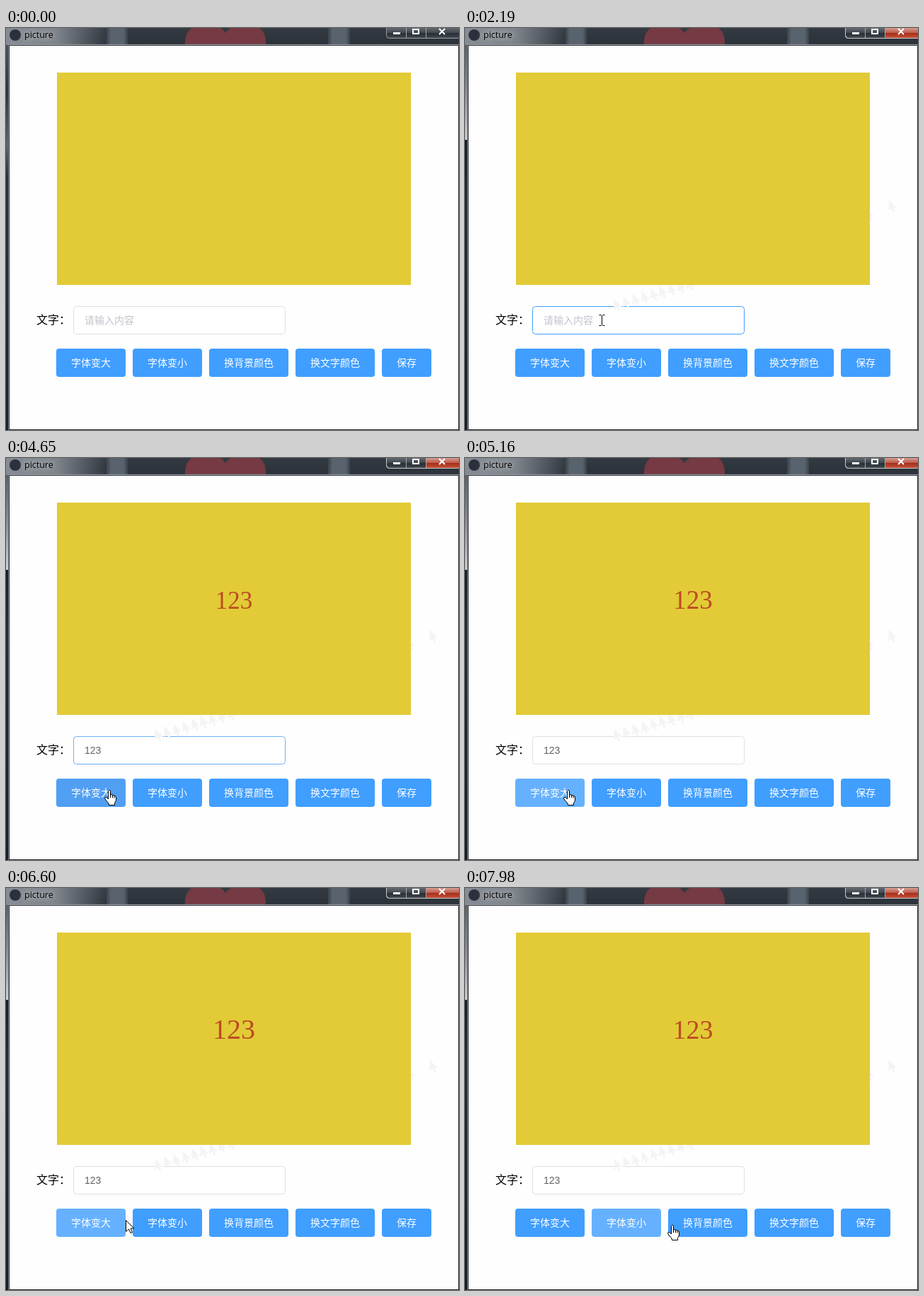
Animation, 640 px wide and 568 px high, one loop 8 s. Source, as an HTML page with a canvas:

```html
<!DOCTYPE html>
<html lang="zh-CN">
<head>
<meta charset="utf-8">
<title>picture</title>
<style>
  html, body { margin: 0; width: 100%; height: 100%; overflow: hidden; background: #fff; }
  canvas { display: block; }
</style>
</head>
<body>
<canvas id="stage" width="640" height="568"></canvas>
<script>
const ctx = document.getElementById('stage').getContext('2d');
const LOOP = 8000, TICK = 30;
const CJK = '"Noto Sans CJK SC", "Noto Sans CJK", sans-serif';

const BASE = [64, 158, 255], HOVER = [102, 177, 255], PRESSED = [58, 142, 230];
const GREY = [220, 223, 230];

// [time, x, y] of the pointer's hot spot
const pointerPath = [
  [600, 633, 208], [630, 598, 242], [900, 313, 352], [1140, 210, 382],
  [1230, 192, 413], [2160, 192, 413], [2190, 193, 413], [3390, 193, 413],
  [3630, 198, 417], [4140, 198, 417], [4380, 145, 469], [6480, 145, 469],
  [6780, 206, 470], [7770, 206, 470], [7980, 292, 476]
];

// colors: [time, color] pairs, each reached by a short transition
const buttons = [
  { x: 71, w: 98, label: '字体变大', colors: [[0, BASE], [4320, HOVER],
    [4620, PRESSED], [4800, HOVER], [4920, PRESSED], [5040, HOVER], [5250, PRESSED], [5430, HOVER],
    [5670, PRESSED], [5850, HOVER], [6030, PRESSED], [6210, HOVER], [6840, BASE]] },
  { x: 179, w: 98, label: '字体变小', colors: [[0, BASE], [6660, HOVER],
    [6840, PRESSED], [6990, HOVER], [7110, PRESSED], [7500, HOVER]] },
  { x: 287, w: 112, label: '换背景颜色', colors: [[0, BASE]] },
  { x: 409, w: 112, label: '换文字颜色', colors: [[0, BASE]] },
  { x: 531, w: 70, label: '保存', colors: [[0, BASE]] }
];
const borderColors = [[0, GREY], [1410, BASE], [4620, GREY]];
const typed = [[0, ''], [2580, '1'], [2790, '12'], [2970, '123']];
const fontSizes = [[0, 35], [4800, 36], [5040, 37], [5430, 38], [5850, 39], [6210, 40], [6990, 39], [7500, 38]];
const caretShown = [[0, false], [1410, true], [1860, false], [2370, true], [3510, false], [3870, true], [4380, false]];

const arrow = new Path2D('M.5 .5V16.5L4.5 13 7 18.5 9.5 17.5 7 12H12Z');
const hand = new Path2D('M5.5 1.5L6.5 .5H8L8.5 1.5V6.5L11 7 14 8 16 9 16.5 11V15L14.5 18.5V21.5H6.5L6 19 2.5 15 .5 12 1 10.5H3L5.5 13Z');
const handLines = new Path2D('M8.5 6V11M11.5 7.5V11M14 8.5V11.5');
const beam = new Path2D('M.5 .5H3.5M5.5 .5H8.5M4.5 1V15M.5 15.5H3.5M5.5 15.5H8.5');

const clamp = v => Math.min(1, Math.max(0, v));
const mix = (a, b, p) => a + (b - a) * p;
const lastIndex = (keys, t) => keys.findLastIndex(k => k[0] <= t);
const valueAt = (keys, t) => keys[lastIndex(keys, t)][1];

function colorAt(keys, t, duration) {
  const i = lastIndex(keys, t), [start, to] = keys[i];
  const from = i ? keys[i - 1][1] : to;
  const p = 1 - (1 - clamp((t - start) / duration)) ** 2;
  return `rgb(${to.map((c, n) => Math.round(mix(from[n], c, p)))})`;
}

function pointerAt(t) {
  const i = lastIndex(pointerPath, t), a = pointerPath[i], b = pointerPath[i + 1] || a;
  const p = clamp((t - a[0]) / (b[0] - a[0] || 1));
  return [Math.round(mix(a[1], b[1], p)), Math.round(mix(a[2], b[2], p))];
}

function rect(x, y, w, h, fill) {
  ctx.fillStyle = fill;
  ctx.fillRect(x, y, w, h);
}

function rounded(x, y, w, h, r, fill, stroke) {
  ctx.beginPath();
  ctx.roundRect(x, y, w, h, r);
  if (fill) { ctx.fillStyle = fill; ctx.fill(); }
  if (stroke) { ctx.strokeStyle = stroke; ctx.lineWidth = 1; ctx.stroke(); }
}

function text(str, x, y, font, fill, align = 'left') {
  ctx.font = font;
  ctx.fillStyle = fill;
  ctx.textAlign = align;
  ctx.fillText(str, x, y);
}

function gradient(x0, y0, x1, y1, ...stops) {
  const g = ctx.createLinearGradient(x0, y0, x1, y1);
  stops.forEach(([at, color]) => g.addColorStop(at, color));
  return g;
}

function drawFrame(active) {
  rect(0, 0, 640, 568, '#1c222a');
  rect(0, 0, 640, 24, gradient(0, 0, 0, 24, [0, '#343a42'], [1, '#2b3139']));
  for (const [x, w] of [[142, 30], [455, 31]])
    rect(x, 0, w, 24, gradient(x, 0, x + w, 0, [0, '#3a424b'], [.2, '#59636e'], [.8, '#59636e'], [1, '#3a424b']));

  ctx.fillStyle = '#753a43';
  ctx.fill(new Path2D('M253 24C252 10 258 1 267 -3H296Q306 0 310 7Q315 0 324 -3H353Q368 3 367 24Z'));

  rect(0, 0, 145, 24, gradient(0, 0, 145, 0, [0, '#868c93'], [.5, '#7c8289'], [1, '#7c828900']));
  rect(0, 24, 4, 544, gradient(0, 24, 0, 568,
    [0, '#4a5058'], [.12, '#282f37'], [.26, '#59616a'], [.34, '#262d36'], [1, '#171d25']));

  ctx.globalAlpha = active;
  rect(0, 24, 4, 134, gradient(0, 24, 0, 158, [0, '#555c64'], [.5, '#878d93'], [1, '#cbced1']));
  rect(0, 158, 4, 410, gradient(0, 158, 0, 568, [0, '#111a25'], [.2, '#1b2835'], [1, '#111a24']));
  ctx.globalAlpha = 1;

  rect(3, 23, 637, 1, '#a9adb2');
  rect(3, 23, 1, 545, '#858b92');
  rect(4, 24, 636, 544, '#20262d');
  rect(5, 25, 634, 542, '#fefefe');

  ctx.beginPath();
  ctx.arc(13, 10, 8, 0, 7);
  ctx.fillStyle = '#2b303c';
  ctx.fill();
  ctx.shadowColor = '#fff';
  ctx.shadowBlur = 9;
  text('picture', 26, 14, '12.5px "Open Sans", sans-serif', '#000');
  ctx.shadowBlur = 0;

  drawWindowButtons(active);
}

function drawWindowButtons(active) {
  const corners = [0, 0, 4, 4];
  rounded(537.5, -2.5, 105, 17, corners,
    gradient(0, 0, 0, 14, [0, '#636970'], [.5, '#40464d'], [.55, '#272d34'], [1, '#444a51']), '#979ca2');
  ctx.globalAlpha = active;
  rect(594, 0, 46, 14, gradient(0, 0, 0, 14, [0, '#d79b91'], [.48, '#bd5c4b'], [.52, '#a52d19'], [1, '#c5533b']));
  rounded(537.5, -2.5, 105, 17, corners, null, '#c6cacd');
  ctx.globalAlpha = 1;
  rect(565, 0, 1, 14, '#a4a9ae');
  rect(593, 0, 1, 14, '#a4a9ae');

  rect(547, 6, 10, 3, '#fff');
  ctx.strokeStyle = '#fff';
  ctx.lineWidth = 2;
  ctx.strokeRect(575, 2, 8, 6);
  ctx.stroke(new Path2D('M612 1L620 9M620 1L612 9'));
}

function drawPage(t) {
  const value = valueAt(typed, t);
  rect(72, 63, 500, 300, '#e2cb36');
  text(value, 322, 213, `${valueAt(fontSizes, t)}px "Liberation Serif", serif`, '#bd4b24', 'center');

  text('文字：', 43, 418, `300 16px ${CJK}`, '#000');
  rounded(95.5, 393.5, 299, 39, 4, '#fff', colorAt(borderColors, t, 200));
  if (value) text(value, 111, 418, '14px "Liberation Sans", sans-serif', '#606266');
  else text('请输入内容', 111, 418, `300 14px ${CJK}`, '#c0c4cc');
  if (valueAt(caretShown, t)) rect(Math.round(111 + value.length * 7.79), 405, 1, 16, '#000');

  for (const { x, w, label, colors } of buttons) {
    rounded(x, 453, w, 40, 4, colorAt(colors, t, 100));
    text(label, x + w / 2, 478, `300 14px ${CJK}`, '#fff', 'center');
  }
}

// Faint marks the pointer leaves on the white page
function drawTrail(t) {
  ctx.save();
  const outside = new Path2D('M5 25H639V393H5ZM72 63H572V363H72Z');
  outside.rect(5, 393, 634, 40);
  ctx.clip(outside, 'evenodd');
  ctx.fillStyle = '#f4f4f4';
  for (let past = 630; past <= 1140 && past < t; past += TICK) {
    const [x, y] = pointerAt(past);
    ctx.setTransform(1, 0, 0, 1, x, y);
    ctx.fill(arrow);
  }
  ctx.restore();
}

function drawPointer(t) {
  if (t < 600) return;
  const [x, y] = pointerAt(t);
  const overInput = x >= 95 && x < 395 && y >= 393 && y < 433;
  const overButton = y >= 453 && y < 493 && buttons.some(b => x >= b.x && x < b.x + b.w);
  ctx.save();
  ctx.strokeStyle = '#000';
  ctx.fillStyle = '#fff';
  ctx.lineWidth = 1;
  if (overInput) {
    ctx.translate(x - 4, y - 8);
    ctx.stroke(beam);
  } else {
    const shape = overButton ? hand : arrow;
    ctx.translate(overButton ? x - 6 : x, y);
    ctx.fill(shape);
    ctx.stroke(shape);
    if (overButton) ctx.stroke(handLines);
  }
  ctx.restore();
}

function draw(now) {
  let t = Math.floor(now % LOOP / TICK) * TICK;
  if (t > 5910 && t < 6060) t = 5910; // the screen pauses briefly here
  drawFrame(clamp((t - 1380) / 180));
  drawPage(t);
  drawTrail(t);
  drawPointer(t);
}

const start = performance.now();
function loop() {
  draw(performance.now() - start);
  requestAnimationFrame(loop);
}
loop();
</script>
</body>
</html>
```
